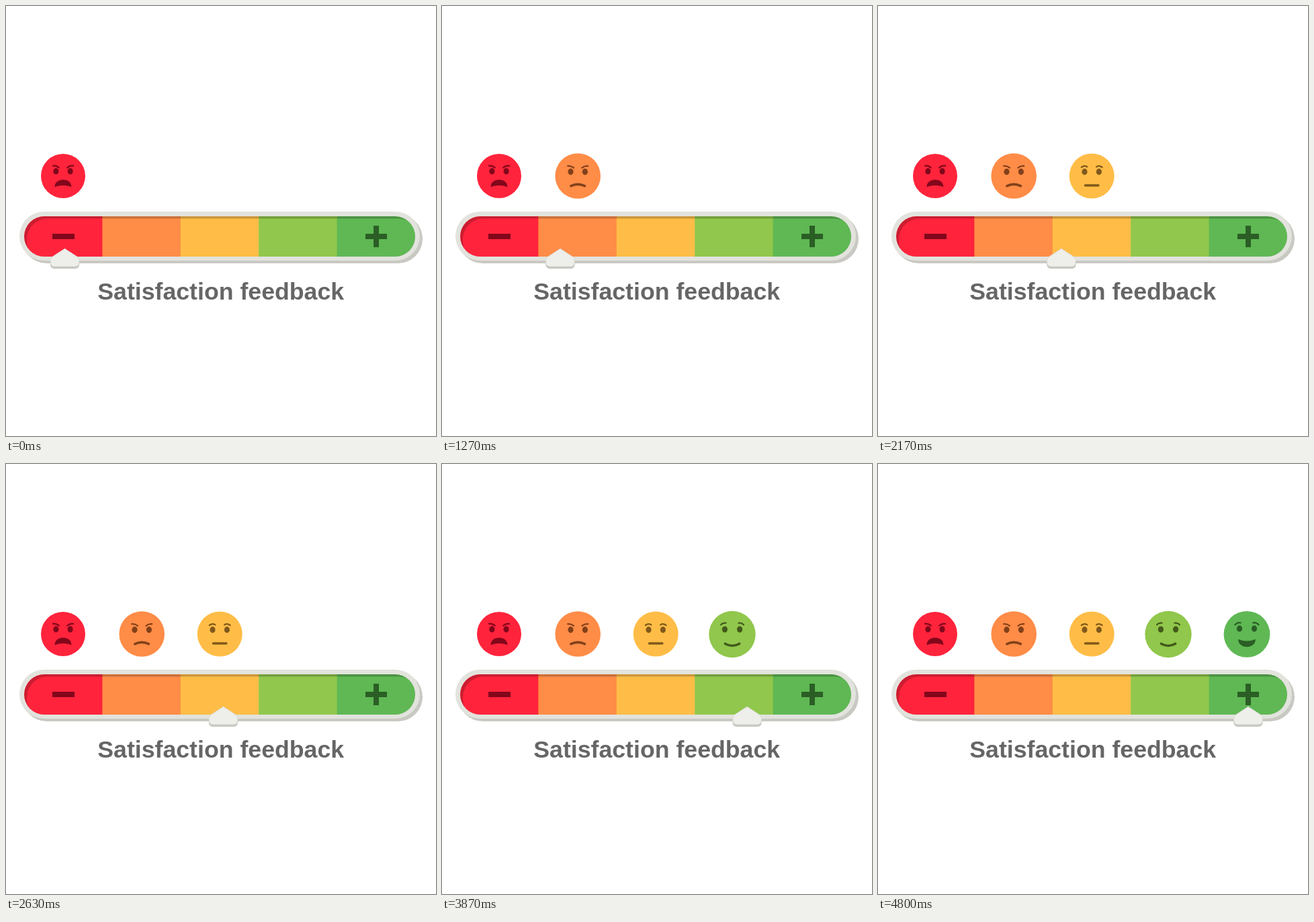
Recreate the animation shown at these times as an HTML page with a canvas. Size 640 px wide and 640 px high, loop 7.21 s.

```html
<!DOCTYPE html>
<html lang="en">
<head>
<meta charset="utf-8">
<title>Satisfaction feedback</title>
<style>
  html, body { margin: 0; width: 100%; height: 100%; overflow: hidden; background: #fff; }
  canvas { display: block; width: 640px; height: 640px; }
</style>
</head>
<body>
<canvas id="stage" width="640" height="640"></canvas>
<script>
const ctx = document.getElementById('stage').getContext('2d');
const LOOP = 7210, STEPS = 110;
const START_X = 87.5, END_X = 551;

// Slider pacing: [time in ms, step]
const PACE = [
  [390, 0], [430, 1], [830, 11], [1130, 18], [1170, 19], [1730, 33],
  [1870, 37], [1930, 38], [2630, 56], [2670, 57], [3370, 74], [3400, 75],
  [3870, 87], [3930, 88], [4070, 92], [4130, 93], [4800, 110]
];

// Brows are drawn for the left eye and mirrored; coordinates are relative to the face centre
const FACES = [
  { x: 85, y: 253, r: 33, color: '#ff243c', ink: '#82071b', eyeX: 10.6, eyeY: -7,
    brow: 'M-15 -15.2Q-10 -15.8 -6.2 -12.4',
    fill: 'M-12.4 16.6C-13 1.8 13 1.8 12.4 16.6C6 13 -6 13 -12.4 16.6Z' },
  { x: 202.2, y: 253, r: 33.8, color: '#ff8c47', ink: '#81401a', eyeX: 10.7, eyeY: -6.3,
    brow: 'M-15 -14.8Q-10 -15.4 -6.2 -12.2',
    line: 'M-10.3 14.8Q0 10 10.3 14.8' },
  { x: 318.2, y: 253, r: 33.5, color: '#ffbd47', ink: '#80591b', eyeX: 10.7, eyeY: -6.2,
    brow: 'M-15.4 -13Q-11 -16.2 -6.8 -13.6',
    line: 'M-9.7 14H9.7' },
  { x: 432, y: 253.5, r: 34.7, color: '#90c74c', ink: '#43591b', eyeX: 11.1, eyeY: -7.4,
    brow: 'M-17 -14.2Q-14 -17.6 -9.5 -16.8',
    line: 'M-10.6 14Q0 20 10.6 14' },
  { x: 549, y: 253.4, r: 34.4, color: '#5fb854', ink: '#2b5e25', eyeX: 11, eyeY: -8.4,
    brow: 'M-17.6 -14Q-14 -18.2 -9.4 -17',
    fill: 'M-12.8 7.4Q0 13 12.8 7.4C13.4 22.6 -13.4 22.6 -12.8 7.4Z' }
];

function stepAt(t) {
  if (t < PACE[0][0]) return 0;
  for (let i = 1; i < PACE.length; i++) {
    const [t0, n0] = PACE[i - 1], [t1, n1] = PACE[i];
    if (t < t1) return Math.floor(n0 + (n1 - n0) * (t - t0) / (t1 - t0) + 1e-6);
  }
  return STEPS;
}

function pill(x, y, w, h) {
  const p = new Path2D();
  p.roundRect(x, y, w, h, h / 2);
  return p;
}

function paint(path, color) {
  ctx.fillStyle = color;
  ctx.fill(path);
}

function rect(x, y, w, h, color) {
  ctx.fillStyle = color;
  ctx.fillRect(x, y, w, h);
}

function drawBar() {
  paint(pill(24, 310, 596, 73), '#c9c8c2');
  paint(pill(20, 306, 596, 73), '#e2e3dd');

  const inner = pill(27, 313, 582, 60);
  ctx.save();
  ctx.clip(inner);
  FACES.forEach((f, i) => rect(27 + i * 116.4, 313, 117, 60, f.color));
  const shade = new Path2D(inner);
  shade.roundRect(31, 316.5, 584, 64, 31);
  shade.rect(27, 373, 0, 0);
  ctx.clip(shade, 'evenodd');
  rect(27, 313, 582, 60, 'rgba(0,0,0,.2)');
  ctx.restore();

  rect(69, 339, 33, 8, FACES[0].ink);
  rect(535, 339, 32, 8, FACES[4].ink);
  rect(547, 327, 8, 32, FACES[4].ink);
}

function drawFace(f) {
  ctx.save();
  ctx.translate(f.x, f.y);
  const head = new Path2D();
  head.arc(0, 0, f.r, 0, 7);
  paint(head, f.color);

  ctx.strokeStyle = f.ink;
  ctx.lineCap = 'round';
  for (const side of [1, -1]) {
    ctx.save();
    ctx.scale(side, 1);
    const eye = new Path2D();
    eye.ellipse(-f.eyeX, f.eyeY, 4.1, 4.7, 0, 0, 7);
    paint(eye, f.ink);
    ctx.lineWidth = 2.2;
    ctx.stroke(new Path2D(f.brow));
    ctx.restore();
  }
  if (f.fill) paint(new Path2D(f.fill), f.ink);
  if (f.line) {
    ctx.lineWidth = 3.6;
    ctx.stroke(new Path2D(f.line));
  }
  ctx.restore();
}

function drawPointer(x) {
  const tag = new Path2D('M0 0L18.5 12Q21.7 14 21.7 17V20Q21.7 27 15.5 27H-15.5Q-21.7 27 -21.7 20V17Q-21.7 14 -18.5 12Z');
  ctx.save();
  ctx.translate(x, 364);
  paint(tag, '#c9c8c2');
  ctx.translate(0, -3.2);
  paint(tag, '#dcdcd6');
  ctx.translate(0, 1);
  ctx.scale(0.96, 0.95);
  paint(tag, '#eeeeea');
  ctx.restore();
}

function drawLabel() {
  ctx.font = 'bold 35.7px "Liberation Sans", Arial, sans-serif';
  ctx.textAlign = 'center';
  ctx.fillStyle = '#666';
  ctx.fillText('Satisfaction feedback', 319.7, 437);
}

function draw(t) {
  const n = stepAt(t);
  rect(0, 0, 640, 640, '#fff');
  drawBar();
  drawLabel();
  FACES.forEach((f, i) => {
    if (i === 0 || n >= 11 + 27.5 * (i - 1)) drawFace(f);
  });
  drawPointer(START_X + (END_X - START_X) * n / STEPS);
}

const begin = performance.now();
function tick() {
  draw((performance.now() - begin) % LOOP);
  requestAnimationFrame(tick);
}
tick();
</script>
</body>
</html>
```
